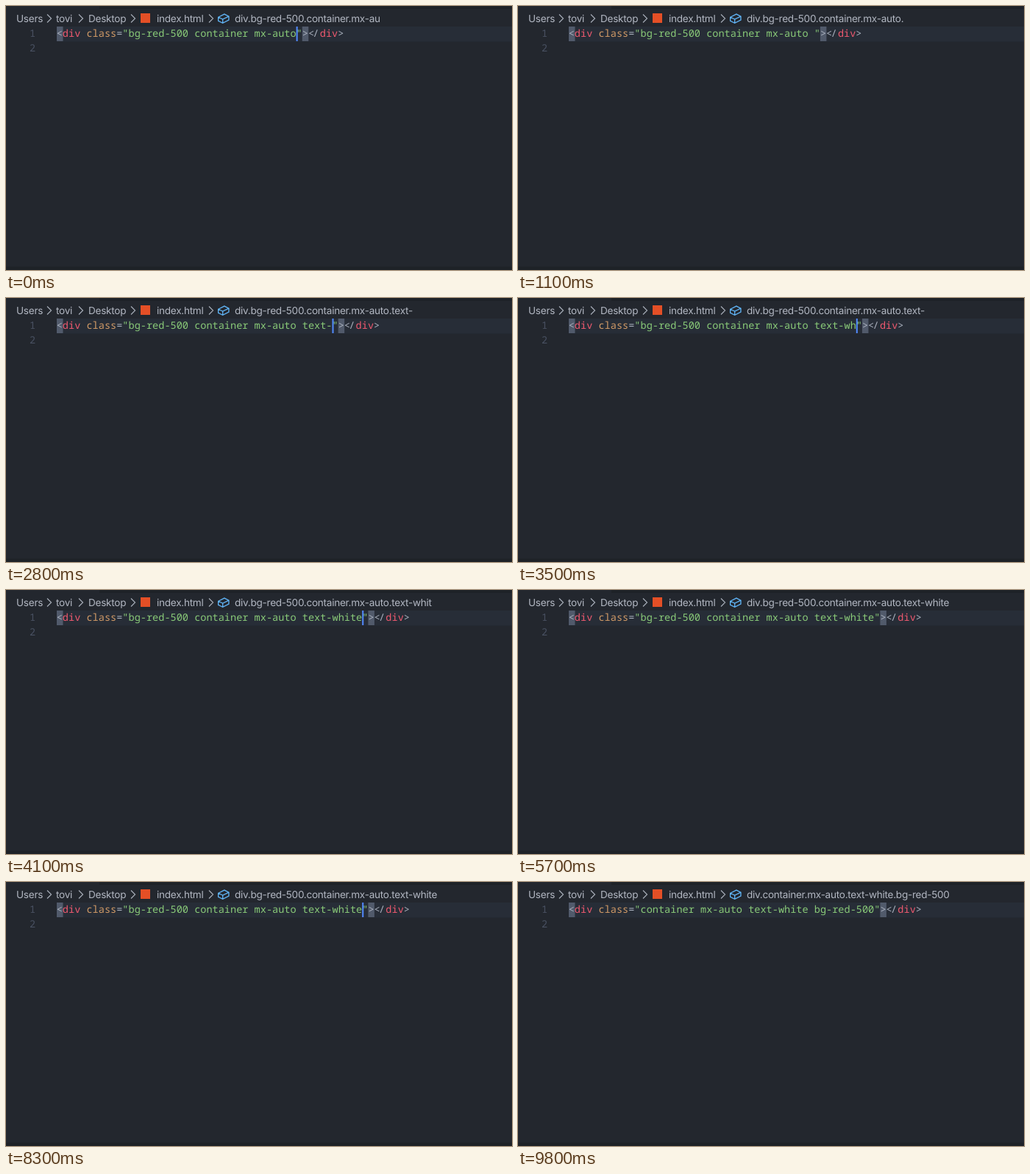
An HTML page for the animation above (9.9 s loop, 688 by 360 pixels).

```html
<!DOCTYPE html>
<html lang="en">
<head>
<meta charset="utf-8">
<title>Class sorting in an editor</title>
<style>
  html, body { margin: 0; width: 100%; height: 100%; overflow: hidden; background: #23272e; }
  svg { display: block; }
  text { white-space: pre; text-rendering: geometricPrecision; }
  .crumbs { font: 13.6px Inter, sans-serif; letter-spacing: -0.28px; fill: #b2b7c2; }
  .code { font: 13.58px "Noto Sans Mono", monospace; font-variant-ligatures: none; fill: #abb2bf; }
  .tag { fill: #ef596f; }
  .attr { fill: #d19a66; }
  .str { fill: #89ca78; }
  .num { fill: #495162; }
  .match { fill: #515a6b; }
  .line { fill: none; stroke: #a5abb6; stroke-width: 1.2; }
</style>
</head>
<body>
<svg width="688" height="360" viewBox="0 0 688 360">
  <rect x="127" width="561" height="4" fill="#1e2227"/>
  <rect y="355.5" width="688" height="4.5" fill="#1e2227"/>
  <rect x="69" y="28" width="619" height="20.5" fill="#272d37"/>

  <g class="crumbs">
    <text x="14" y="21.7">Users</text>
    <text x="68" y="21.7">tovi</text>
    <text x="112" y="21.7">Desktop</text>
    <text x="205" y="21.7">index.html</text>
    <text x="311" y="21.7" id="symbol"></text>
  </g>
  <path class="line" d="M56 11.500l5.500 5.500-5.500 5.500M99 11.500l5.500 5.500-5.500 5.500M170 11.500l5.500 5.500-5.500 5.500M276 11.500l5.500 5.500-5.500 5.500"/>
  <rect x="183" y="10" width="13" height="13" fill="#e44f26"/>
  <path class="line" style="stroke:#61b5f7" transform="translate(287 8.300) scale(1.100)"
    d="M1.500 6.300L9 2.500l5.500 2.800v4.600L7 13.600l-5.500-2.700zL7 8.800l7.500-3.500M7 8.800v4.800"/>

  <g class="code">
    <text class="num" x="32" y="42">1</text>
    <text class="num" x="32" y="62">2</text>
    <rect class="match" x="69" y="28" width="8.500" height="20"/>
    <text x="68.700" y="42">&lt;<tspan class="tag">div</tspan> <tspan class="attr">class</tspan>=<tspan class="str">"</tspan><tspan class="str" id="classes"></tspan></text>
    <g id="tail">
      <rect class="match" x="8.150" y="28" width="8.500" height="20"/>
      <text y="42"><tspan class="str">"</tspan>&gt;&lt;<tspan dx="-1.800">/</tspan><tspan class="tag" dx="1.300">div</tspan>&gt;</text>
      <rect id="caret" y="28" width="2" height="20" fill="#528bff"/>
    </g>
  </g>
</svg>
<script>
  const LOOP = 9900, LAG = 300, BLINK = 500, SORT_AT = 8500;
  const CHAR = 8.148, CLASS_X = 68.7 + 12 * CHAR;
  const START = "bg-red-500 container mx-au";
  const TYPED = "to text-white";
  const SORTED = "container mx-auto text-white bg-red-500";
  // When each character of TYPED is entered, in ms
  const KEYS = [-150, -50, 500, 1450, 1550, 1650, 1850, 2380, 3300, 3450, 3580, 3690, 3900];

  const [symbol, classes, tail, caret] =
    ["symbol", "classes", "tail", "caret"].map(id => document.getElementById(id));

  const keysBy = t => KEYS.filter(k => k <= t);
  const classesAt = t => t >= SORT_AT ? SORTED : START + TYPED.slice(0, keysBy(t).length);

  function draw(t) {
    const value = classesAt(t);
    classes.textContent = value;
    symbol.textContent = "div." + classesAt(t - LAG).replaceAll(" ", ".");
    tail.setAttribute("transform", `translate(${CLASS_X + value.length * CHAR} 0)`);
    // Each key press restarts the blink
    const idle = t - keysBy(t).pop();
    caret.style.opacity = Math.floor(idle / BLINK) % 2 ? 0 : 1;
  }

  const begin = performance.now();
  function tick() {
    draw((performance.now() - begin) % LOOP);
    requestAnimationFrame(tick);
  }
  tick();
</script>
</body>
</html>
```
